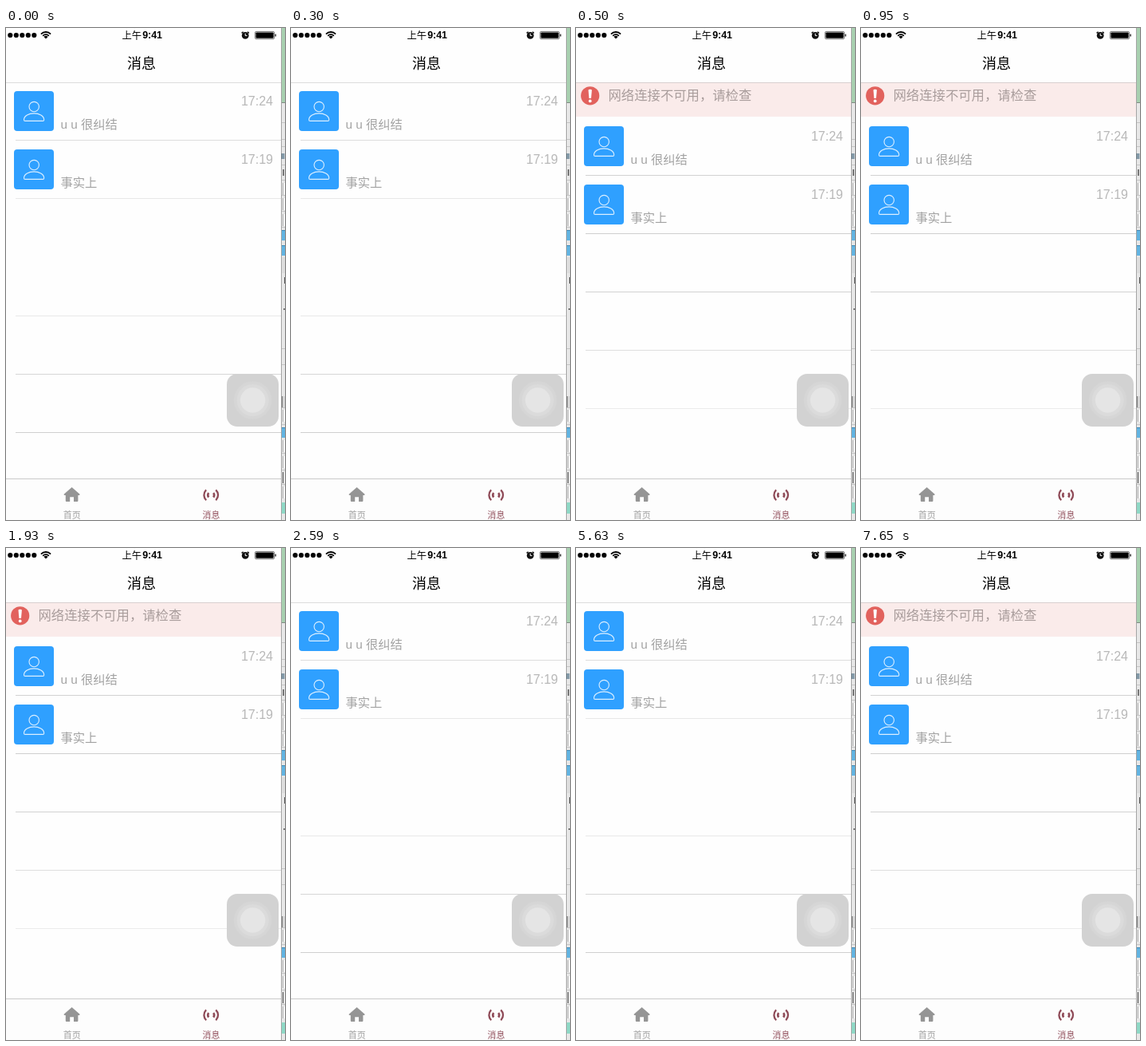
An HTML page with a canvas that plays this animation: 350 px wide and 616 px high, repeating every 8000 ms.

```html
<!DOCTYPE html>
<html lang="zh-CN">
<head>
<meta charset="utf-8">
<title>消息</title>
<style>
html, body { margin: 0; width: 100%; height: 100%; overflow: hidden; background: #fff; }
canvas { display: block; width: 350px; height: 616px; }
</style>
</head>
<body>
<canvas id="stage" width="350" height="616"></canvas>
<script>
const ctx = document.getElementById('stage').getContext('2d');
const FONT = '"Liberation Sans", "Noto Sans CJK SC", "Noto Sans CJK", sans-serif';
const LOOP = 8000;
const SHIFT = 44;

function rect(x, y, w, h, color) {
  ctx.fillStyle = color;
  ctx.fillRect(x, y, w, h);
}

function round(x, y, w, h, r, color) {
  ctx.fillStyle = color;
  ctx.beginPath();
  ctx.roundRect(x, y, w, h, r);
  ctx.fill();
}

function disc(x, y, r, color) {
  ctx.fillStyle = color;
  ctx.beginPath();
  ctx.arc(x, y, r, 0, Math.PI * 2);
  ctx.fill();
}

function arc(x, y, r, from, to, width, color) {
  ctx.strokeStyle = color;
  ctx.lineWidth = width;
  ctx.beginPath();
  ctx.arc(x, y, r, from, to);
  ctx.stroke();
}

function shape(d, color, width) {
  const path = new Path2D(d);
  if (width) {
    ctx.strokeStyle = color;
    ctx.lineWidth = width;
    ctx.stroke(path);
  } else {
    ctx.fillStyle = color;
    ctx.fill(path);
  }
}

function text(str, x, y, size, color, align = 'left', weight = 400) {
  ctx.font = `${weight} ${size}px ${FONT}`;
  ctx.textAlign = align;
  ctx.fillStyle = color;
  ctx.fillText(str, x, y);
}

function statusBar() {
  for (let i = 0; i < 5; i++) disc(5.3 + i * 7.5, 9, 3.1, '#000');
  const up = -Math.PI / 2, half = Math.PI / 4;
  arc(50, 13.6, 8.6, up - half, up + half, 1.8, '#000');
  arc(50, 13.6, 5.4, up - half, up + half, 1.7, '#000');
  shape('M50 13.6 L47.4 10.9 Q50 8.8 52.6 10.9 Z', '#000');
  text('上午', 145.5, 13.6, 12.3, '#000', 'left', 500);
  text('9:41', 196, 13.4, 12.4, '#000', 'right', 700);

  disc(300.2, 9.4, 4.4, '#111');
  shape('M295.6 6.4 L297.6 4.8 M302.8 4.8 L304.8 6.4', '#111', 1.4);
  shape('M300.2 6.8 V9.6 H302.4', '#fff', 1);

  ctx.strokeStyle = '#555';
  ctx.lineWidth = 0.8;
  ctx.beginPath();
  ctx.roundRect(312.4, 4.4, 24.2, 9.4, 1.5);
  ctx.stroke();
  round(313.4, 5.4, 22.2, 7.4, 0.8, '#000');
  round(337.4, 7.4, 1.5, 3.4, 0.7, '#333');
}

function row(y, msg, time) {
  ctx.save();
  ctx.translate(0, y);
  round(10, 0, 50, 50, 4, '#2fa0ff');
  arc(35.2, 19.6, 6.2, 0, Math.PI * 2, 1.1, '#dcefff');
  shape('M22.5 36 C22.5 25.2 47.7 25.2 47.7 36 Q47.7 37.4 46.2 37.4 H24 Q22.5 37.4 22.5 36 Z', '#dcefff', 1.1);
  text(msg, 68.5, 46.8, 15.3, '#a2a2a2');
  text(time, 335, 18, 16, '#b8b8b8', 'right');
  ctx.restore();
}

function banner() {
  rect(0, 69, 345, 42, '#faebea');
  disc(17.7, 84.8, 11.6, '#e2625d');
  shape('M15.5 77.4 Q17.7 76.2 19.9 77.4 L19 88 H16.4 Z', '#fff');
  disc(17.7, 91.4, 1.9, '#fff');
  text('网络连接不可用，请检查', 40.5, 89.8, 16.35, '#a89c9b');
}

function list(offline) {
  const lines = offline
    ? [[184, '#d2d2d2'], [257, '#cfcfcf'], [330, '#d2d2d2'], [403, '#dedede'], [476, '#ebebeb']]
    : [[140, '#dcdcdc'], [213, '#e8e8e8'], [360, '#e8e8e8'], [433, '#d6d6d6'], [506, '#d0d0d0']];
  for (const [y, color] of lines) rect(12, y, 333, 1, color);
  if (offline) banner();
  const dy = offline ? SHIFT : 0;
  row(79 + dy, 'u u 很纠结', '17:24');
  row(152 + dy, '事实上', '17:19');
}

function touchButton() {
  round(277, 433, 65, 66, 13, '#d2d2d2');
  disc(309.6, 466, 23.8, '#d6d6d6');
  disc(309.6, 466, 20, '#dbdbdb');
  disc(309.6, 466, 15.7, '#e5e5e5');
}

function tabBar() {
  rect(0, 564, 345, 52, '#fdfdfd');
  rect(0, 564, 345, 1, '#cacaca');
  const gray = '#959595', red = '#8f4b58';
  shape('M82.6 575 L92.6 583.8 Q92.8 585 91.4 585 H90.4 V592 Q90.4 593 89.4 593 H85 V587.2 H80.2 V593 H75.8 Q74.8 593 74.8 592 V585 H73.8 Q72.4 585 72.6 583.8 Z', gray);
  text('首页', 82.8, 614, 11, '#a0a0a0', 'center');

  for (const side of [0, Math.PI]) {
    arc(257.2, 584.8, 8.8, side - 0.82, side + 0.82, 2.3, red);
    arc(257.2, 584.8, 4, side - 0.75, side + 0.75, 2.7, red);
  }
  text('消息', 257.4, 614, 10.8, red, 'center');
}

// Sliver of the window behind the phone
function edge() {
  rect(345, 0, 5, 616, '#e8e8e8');
  rect(346, 0, 4, 93, '#a8d0b0');
  rect(346, 93, 4, 1, '#7d8a80');
  for (const y of [118, 139, 148, 171, 190, 209, 229, 249, 306, 401, 421, 475, 496, 532, 553, 571]) {
    rect(346, y, 4, 1, '#c4c4c4');
  }
  for (const y of [194, 213, 233, 478, 516, 536, 574]) {
    rect(347, y, 3, 15, '#fafafa');
    rect(347, y, 1, 15, '#aaa');
  }
  for (const y of [253, 272, 500]) {
    rect(346, y, 4, 13, '#62b4e2');
    rect(346, y, 4, 1, '#3d87b5');
  }
  rect(346, 287, 4, 20, '#dedede');
  rect(346, 594, 4, 14, '#8fd9c6');
  rect(346, 157, 1, 7, '#2d5873');
  rect(348, 157, 1, 7, '#2d5873');
  rect(347, 177, 2, 8, '#777');
  rect(349, 312, 1, 8, '#555');
  rect(348, 351, 2, 2, '#777');
  rect(347, 461, 3, 14, '#d5d5d5');
  rect(346, 461, 1, 14, '#777');
  rect(347, 556, 1, 14, '#444');
  rect(345, 0, 1, 616, '#a4a4a4');
}

function draw(t) {
  const offline = (t >= 500 && t < 2590) || t >= 7650;
  rect(0, 0, 350, 616, '#fefefe');
  statusBar();
  text('消息', 170, 50.8, 18, '#000', 'center', 500);
  rect(0, 68, 345, 1, offline ? '#d8cfcf' : '#dcdcdc');
  list(offline);
  tabBar();
  edge();
  touchButton();
}

const start = performance.now();
function tick() {
  draw((performance.now() - start) % LOOP);
  requestAnimationFrame(tick);
}
tick();
</script>
</body>
</html>
```
